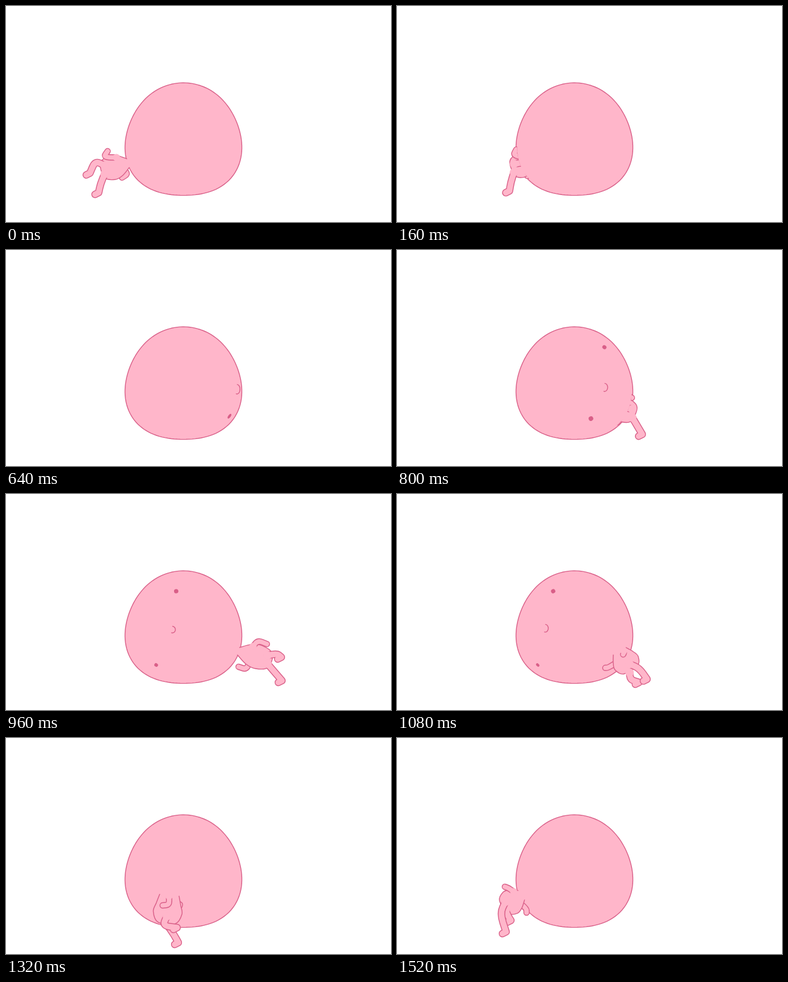
Animation of 639x360 px, one loop 1.56 s. Source, as an HTML page with a canvas:

```html
<!DOCTYPE html>
<html lang="en">
<head>
<meta charset="utf-8">
<title>Round head walk</title>
<style>
  html, body { margin: 0; width: 100%; height: 100%; overflow: hidden; background: #fff; }
  canvas { display: block; }
</style>
</head>
<body>
<canvas id="stage" width="639" height="360"></canvas>
<script>
const ctx = document.getElementById('stage').getContext('2d');
const LOOP = 1560, STEP = 40, TAU = Math.PI * 2;
const PINK = '#ffb6ca', LINE = '#d95f88', LINE_WIDTH = 1.4;
const CX = 294, CY = 222, R = 95;
const LEG = 11, ARM = 9;

const { sin, cos, abs, sqrt, min, max, hypot } = Math;
const rad = degrees => degrees * Math.PI / 180;
const mix = (a, b, k) => Array.isArray(a) ? a.map((v, i) => mix(v, b[i], k)) : a + (b - a) * k;
const shift = ([x, y], dx, dy) => [x + dx, y + dy];

// Joints: hip, then knee and foot (near, far), then elbow and hand (near, far).
const left = [[163, 273], [146, 258], [137, 279], [156, 297], [153, 311], [161, 252], [168, 242], [203, 279], [192, 286]];
const right = [[434, 276], [450, 266], [457, 272], [446, 297], [458, 311], [418, 244], [433, 250], [401, 293], [386, 288]];
const frontRight = [[354, 300], [370, 306], [387, 333], [348, 318], [364, 316], [350, 277], [337, 279], [318, 287], [319, 291]];
const front = [[267, 304], [260, 313], [284, 316], [279, 328], [286, 341], [271, 278], [260, 279], [289, 276], [288, 280]];
const frontLeft = [[180, 280], [171, 292], [181, 323], [185, 298], [189, 304], [185, 250], [179, 248], [215, 284], [215, 291]];
const walk = [[960, right], [1160, frontRight], [1320, front], [1520, frontLeft], [LOOP, left]];

function sample(keys, t) {
  let i = 0;
  while (i < keys.length - 2 && t >= keys[i + 1][0]) i++;
  const [t0, a] = keys[i], [t1, b] = keys[i + 1];
  return mix(a, b, max(0, min(1, (t - t0) / (t1 - t0))));
}

// Smooth open curve through the given points.
function trace(path, pts) {
  const at = i => pts[max(0, min(pts.length - 1, i))];
  path.moveTo(...pts[0]);
  for (let i = 0; i < pts.length - 1; i++) {
    const [a, b, c, d] = [at(i - 1), at(i), at(i + 1), at(i + 2)];
    path.bezierCurveTo(b[0] + (c[0] - a[0]) / 6, b[1] + (c[1] - a[1]) / 6,
      c[0] - (d[0] - b[0]) / 6, c[1] - (d[1] - b[1]) / 6, ...c);
  }
  return path;
}

// A circle made heavier low on both sides.
function headOutline(scale) {
  const path = new Path2D();
  for (let d = 0; d < 360; d += 3) {
    const a = rad(d);
    const r = 95.9 + 3.2 * sin(a) + 3.4 * sin(3 * a) + 0.5 * cos(a) + 1.1 * cos(2 * a) - cos(4 * a);
    path.lineTo(CX + scale * r * cos(a), CY + scale * r * sin(a));
  }
  path.closePath();
  return path;
}

const head = headOutline(1);
const outside = new Path2D();
outside.rect(0, 0, 639, 360);
outside.addPath(headOutline(0.98));

// A limb is a thick bent line whose root blends into the torso.
function drawLimb(width, root, joint, ...tip) {
  const path = new Path2D();
  path.moveTo(...root);
  path.lineTo(...mix(root, joint, 0.5));
  path.quadraticCurveTo(...joint, ...mix(joint, tip[0], 0.5));
  tip.forEach(p => path.lineTo(...p));
  ctx.strokeStyle = LINE;
  ctx.lineWidth = width + LINE_WIDTH;
  ctx.stroke(path);
  ctx.strokeStyle = PINK;
  ctx.lineWidth = width - LINE_WIDTH;
  ctx.stroke(path);
  ctx.beginPath();
  ctx.arc(...root, width / 2 + 1.5, 0, TAU);
  ctx.fill();
}

function drawLeg(root, knee, foot) {
  drawLimb(LEG, root, knee, foot, shift(foot, -6, 3));
}

function drawTorso(neck, hip, facing) {
  const length = hypot(hip[0] - neck[0], hip[1] - neck[1]);
  const ux = (hip[0] - neck[0]) / length, uy = (hip[1] - neck[1]) / length;
  const neckHalf = 6.5 + 10 * facing, belly = 20 + 4 * facing;
  const at = (along, side) => shift(neck, ux * along * length - uy * side, uy * along * length + ux * side);
  const profile = [[0, neckHalf], [0.35, belly * 0.85], [0.7, belly], [1.1, belly * 0.6]];
  const outline = [
    ...profile.map(([along, side]) => at(along, side)),
    ...profile.reverse().map(([along, side]) => at(along, -side))
  ];
  const edge = trace(new Path2D(), outline);
  const area = new Path2D(edge);
  area.lineTo(...mix(neck, [CX, CY], 0.08));
  ctx.fill(area);
  ctx.strokeStyle = LINE;
  ctx.lineWidth = LINE_WIDTH;
  ctx.stroke(edge);
}

function drawBody(t) {
  const turn = rad(90 - 0.29 * (t < 640 ? t + 600 : t - 960));
  const side = abs(sin(turn)), facing = max(0, cos(turn));
  const behind = t <= 960;
  let neck = [CX + 92 * sin(turn), 262];
  let joints = t < 640 ? left : sample(walk, t);
  if (behind) {
    // Foreshorten the side view and fold the near leg away.
    const recede = ([x, y]) => [CX + (x - CX) * side, y - 12 * (1 - side)];
    const fold = min(1, 4 * (1 - side));
    joints = joints.map(recede);
    neck = shift(neck, 0, -12 * (1 - side));
    joints[1] = mix(joints[1], neck, fold);
    joints[2] = mix(joints[2], neck, fold);
  }
  const [hip, nearKnee, nearFoot, farKnee, farFoot, nearElbow, nearHand, farElbow, farHand] = joints;
  const shoulder = shift(mix(neck, hip, 0.5 * side), 0, -15 * side);

  ctx.save();
  if (behind) ctx.clip(outside, 'evenodd');
  drawLimb(ARM, mix(neck, hip, 0.4), farElbow, farHand);
  drawTorso(neck, hip, facing);
  drawLeg(shift(hip, 0, 7), farKnee, farFoot);
  drawLeg(shift(hip, 0, -7), nearKnee, nearFoot);
  drawLimb(ARM, shoulder, nearElbow, nearHand);
  ctx.restore();
}

// Point on the head at a given longitude and height.
function place(angle, y) {
  return [CX + sqrt(R * R - (y - CY) ** 2) * sin(rad(angle)), y];
}

function drawEye(angle, y, size) {
  if (abs(angle) > 88) return;
  const at = place(angle, y), dx = at[0] - CX, dy = at[1] - CY;
  const flat = sqrt(max(0.2, 1 - (hypot(dx, dy) / R) ** 8));
  ctx.beginPath();
  ctx.ellipse(...at, size * flat, size, Math.atan2(dy, dx), 0, TAU);
  ctx.fill();
}

function drawFace(t) {
  const angle = sample([[640, 78], [960, -9], [1160, -41], [1280, -92]], t);
  const roll = min(1, (t - 640) / 320);
  ctx.fillStyle = LINE;
  drawEye(angle + 17 * (1 - roll), 162, 3.6);
  drawEye(angle + mix(5, -30, roll), mix(277, 285, roll), mix(4.5, 3.2, roll));
  if (abs(angle) > 88) return;
  const [x, y] = place(angle, mix(232, 226, (t - 640) / 320));
  ctx.beginPath();
  ctx.ellipse(x - 3, y, 5, 5 + 3 * abs(sin(rad(angle))), 0, rad(-85), rad(105));
  ctx.stroke();
}

function draw(t) {
  ctx.fillStyle = '#fff';
  ctx.fillRect(0, 0, 639, 360);
  ctx.fillStyle = PINK;
  ctx.strokeStyle = LINE;
  ctx.lineWidth = LINE_WIDTH;
  ctx.lineCap = ctx.lineJoin = 'round';
  ctx.fill(head);
  ctx.stroke(head);
  if (t >= 640 && t < 1280) drawFace(t);
  ctx.fillStyle = PINK;
  if (t < 320 || t > 640) drawBody(t);
}

const start = performance.now();
function tick() {
  const t = (performance.now() - start) % LOOP;
  draw(Math.floor(t / STEP) * STEP);
  requestAnimationFrame(tick);
}
tick();
</script>
</body>
</html>
```
